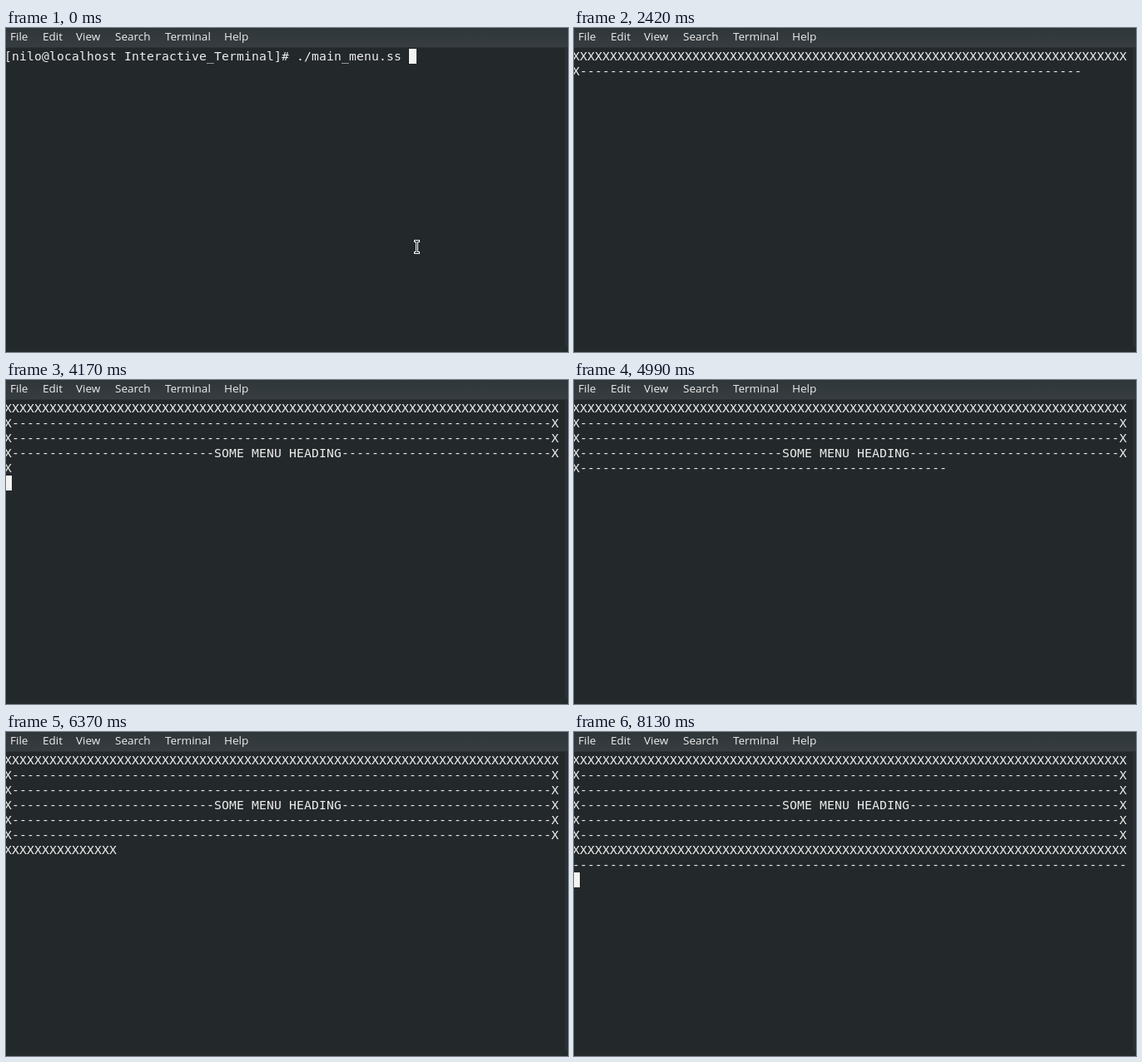
Write an HTML page that moves like this. It is 675 by 390 pixels and loops after 8.29 s.

```html
<!DOCTYPE html>
<html lang="en">
<head>
<meta charset="utf-8">
<title>Terminal menu</title>
<style>
  html, body { margin: 0; width: 100%; height: 100%; overflow: hidden; background: #23282b; }
  #stage { position: relative; width: 675px; height: 390px; overflow: hidden; background: #23282b; }
  #stage > * { position: absolute; }
  #menu {
    left: 0; top: 0; width: 675px; height: 23px;
    background: linear-gradient(#30373a, #363c40);
    border-bottom: 1px solid #2b3134;
    font: 13.5px/20px "Open Sans", "Noto Sans", sans-serif;
    color: #eeeeec;
  }
  #menu span { position: absolute; top: 0; }
  #side { right: 0; top: 24px; width: 4px; height: 366px; background: #292f32; }
  #base { left: 0; bottom: 0; width: 675px; height: 6px; background: #24292c; }
  #text {
    left: -2px; top: 25px; margin: 0; white-space: pre;
    font: 14.67px/18px "DejaVu Sans Mono", monospace;
    letter-spacing: calc(9px - 1ch);
    font-variant-ligatures: none;
    color: #eeeeec;
  }
  #cursor { width: 9px; height: 18px; background: #f3f3f1; }
  #pointer { left: 489px; top: 254px; }
</style>
</head>
<body>
<div id="stage">
  <div id="menu"></div>
  <div id="side"></div>
  <div id="base"></div>
  <div id="cursor"></div>
  <pre id="text"></pre>
  <svg id="pointer" width="10" height="19" fill="none">
    <path d="M1 2.5h7M1 16.5h7M4.5 2v15" stroke="#fff" stroke-width="3"/>
    <path d="M2 2.5h5M2 16.5h5M4.5 2v15" stroke="#15191b"/>
  </svg>
</div>
<script>
  const LOOP = 8290, START = 510, END = 8130, STEP = 36;
  const COLS = 74, CELL_W = 9, CELL_H = 18, LEFT = -2, TOP = 25;
  const PROMPT = "[nilo@localhost Interactive_Terminal]# ./main_menu.ss ";

  const edge = "X".repeat(COLS);
  const dashes = n => "-".repeat(n);
  const side = "X" + dashes(COLS - 2) + "X";
  const heading = "X" + dashes(27) + "SOME MENU HEADING" + dashes(28) + "X";
  const banner = [edge, side, side, heading, side, side, edge, dashes(COLS)];
  const total = banner.length * COLS;

  // Time in ms, characters printed, cursor shown
  const keys = [
    [START, 0, 1], [530, 0], [1330, 58], [2420, 142, 0], [2470, 142],
    [4170, 297, 1], [4220, 297], [4990, 346, 0], [5010, 346],
    [6370, 459, 0], [6430, 459], [END, total, 1]
  ];
  // Moments when the cleared screen shows before the redraw
  const clears = [1120, 1760, 3460, 4360, 5200, 6040, 6860, 7720];
  const CLEAR_MS = 20;

  const $ = id => document.getElementById(id);
  const text = $("text"), cursor = $("cursor"), pointer = $("pointer");

  const items = [["File", 5], ["Edit", 44], ["View", 84], ["Search", 131], ["Terminal", 191], ["Help", 262]];
  for (const [label, x] of items) {
    const item = document.createElement("span");
    item.textContent = label;
    item.style.left = x + "px";
    $("menu").append(item);
  }

  function printed(t) {
    let i = keys.length - 1;
    while (keys[i][0] > t) i--;
    const [t0, n0, shown] = keys[i];
    const next = keys[i + 1];
    if (!next) return { count: n0, shown };
    const step = Math.floor((t - t0) / STEP);
    const count = Math.round(n0 + (next[1] - n0) * step * STEP / (next[0] - t0));
    return { count, shown: step === 0 && shown !== undefined ? shown : step % 3 === 1 };
  }

  function wrap(count) {
    const rows = Math.ceil(count / COLS);
    const lines = banner.slice(0, rows);
    if (rows) lines[rows - 1] = lines[rows - 1].slice(0, count - (rows - 1) * COLS);
    return lines;
  }

  function stateAt(t) {
    if (t < START) return { lines: [PROMPT], col: PROMPT.length, row: 0, shown: true };
    const cleared = clears.findIndex(c => t >= c && t < c + CLEAR_MS);
    if (cleared >= 0) return { lines: [], col: 0, row: 0, shown: cleared < clears.length - 1 };
    const { count, shown } = printed(t);
    const lines = wrap(count);
    return { lines, col: 0, row: lines.length, shown };
  }

  function draw() {
    const t = performance.now() % LOOP;
    const { lines, col, row, shown } = stateAt(t);
    const content = lines.join("\n");
    if (text.textContent !== content) text.textContent = content;
    cursor.style.left = LEFT + col * CELL_W + "px";
    cursor.style.top = TOP + row * CELL_H + "px";
    cursor.style.visibility = shown ? "visible" : "hidden";
    pointer.style.visibility = t < START ? "visible" : "hidden";
    requestAnimationFrame(draw);
  }
  draw();
</script>
</body>
</html>
```
